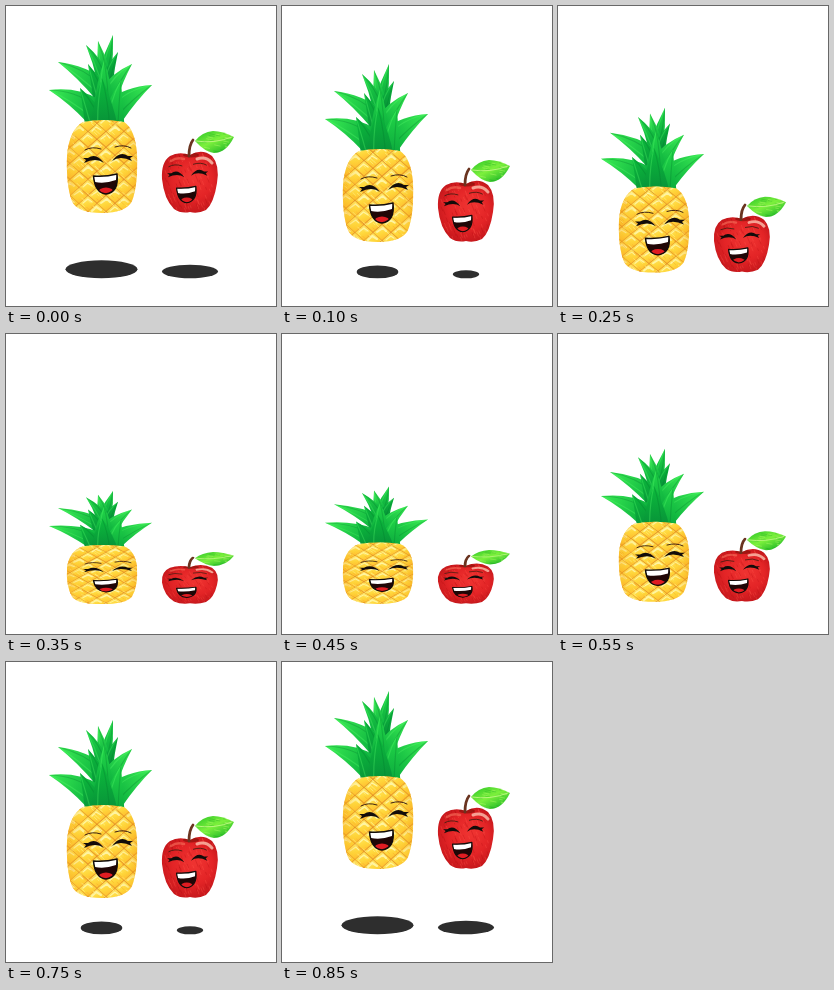
These frames come from a looping animation (270 by 300 pixels, 900 ms). An HTML page with a canvas:

```html
<!DOCTYPE html>
<html lang="en">
<head>
<meta charset="utf-8">
<title>Bouncing fruit</title>
<style>
  html, body { margin: 0; width: 100%; height: 100%; overflow: hidden; background: #fff; }
  canvas { display: block; }
</style>
</head>
<body>
<canvas id="stage" width="270" height="300"></canvas>
<script>
const ctx = document.getElementById('stage').getContext('2d');
const STEP = 50, STEPS = 18, GROUND = 265, REST = 207;
const SQUASH = [.925, .79, .635, .61, .66, .76, .86, .925];

let seed = 1;
function rnd() {
  seed = (seed * 16807) % 2147483647;
  return seed / 2147483647;
}
const between = (a, b) => a + (b - a) * rnd();

function fill(path, style) {
  ctx.fillStyle = style;
  ctx.fill(path);
}

function stroke(d, color, width) {
  ctx.strokeStyle = color;
  ctx.lineWidth = width;
  ctx.stroke(new Path2D(d));
}

function ellipse(x, y, rx, ry, style) {
  const p = new Path2D();
  p.ellipse(x, y, rx, ry, 0, 0, Math.PI * 2);
  fill(p, style);
}

function gradient(g, ...colors) {
  colors.forEach((c, i) => g.addColorStop(i / (colors.length - 1), c));
  return g;
}

function clipped(path, draw) {
  ctx.save();
  ctx.clip(path);
  draw();
  ctx.restore();
}

// Short pencil strokes scattered over a box
function pencil(n, x0, y0, x1, y1, dx, dy, colors) {
  for (let i = 0; i < n; i++) {
    const x = between(x0, x1), y = between(y0, y1), k = between(.5, 1.2);
    stroke(`M${x} ${y}l${dx * k} ${dy * k}`, colors[i % colors.length], .8);
  }
}

// Pointed leaf from base (ax, ay) to tip (tx, ty)
function blade(ax, ay, tx, ty, w, bend, base, tip) {
  const len = Math.hypot(tx - ax, ty - ay);
  const nx = -(ty - ay) / len, ny = (tx - ax) / len;
  const mx = (ax + tx) / 2 + nx * bend, my = (ay + ty) / 2 + ny * bend;
  const at = (x, y, k) => `${x + nx * w * k} ${y + ny * w * k}`;
  const p = new Path2D(`M${at(ax, ay, .5)}Q${at(mx, my, .36)} ${tx} ${ty}` +
    `Q${at(mx, my, -.36)} ${at(ax, ay, -.5)}Z`);
  fill(p, gradient(ctx.createLinearGradient(ax, ay, tx, ty), base, tip));
  clipped(p, () => {
    for (const k of [-.22, .2]) {
      stroke(`M${at(ax, ay, k)}Q${at(mx, my, k)} ${tx} ${ty}`,
        k > 0 ? 'rgba(0,120,45,.3)' : 'rgba(90,255,110,.3)', 1.2);
    }
  });
}

function face(x, y, k, eyeShift) {
  ctx.save();
  ctx.translate(x, y);
  ctx.scale(k, k);
  for (const [ex, ey, side] of [[-11, -17, -1], [17, -19, 1]]) {
    ctx.save();
    ctx.translate(ex + eyeShift, ey);
    ctx.scale(side, 1);
    fill(new Path2D('M-10 4Q-2 -7 6 -1L11 -1L8 1L10 4Q-2 -2 -10 4Z'), '#120c0a');
    stroke('M-7 -10Q2 -13 9 -9', '#3a1d10', 1);
    ctx.restore();
  }
  const mouth = new Path2D('M-11.5 0Q0 1 12 -2Q14 16 1 18Q-10 17 -11.5 0Z');
  fill(mouth, '#200606');
  clipped(mouth, () => {
    fill(new Path2D('M-12 0Q0 1 12 -3L11 4Q0 8 -10 6Z'), '#fff');
    ellipse(1, 17, 8, 5.5, '#e01c22');
  });
  ctx.strokeStyle = '#120c0a';
  ctx.lineWidth = 1.5;
  ctx.stroke(mouth);
  ctx.restore();
}

function scales() {
  const w = 18, h = 16;
  for (let row = 0; row < 14; row++) {
    for (let col = 0; col < 6; col++) {
      const x = 55 + col * w + (row % 2) * w / 2, y = 110 + row * h / 2;
      const p = new Path2D(
        `M${x - w / 2} ${y}L${x} ${y - h / 2}L${x + w / 2} ${y}L${x} ${y + h / 2}Z`);
      fill(p, gradient(ctx.createLinearGradient(x - 3, y - 8, x + 3, y + 8),
        '#ffe86a', '#ffd83c', '#ffb92e'));
      stroke(`M${x - w / 2} ${y}L${x} ${y + h / 2}L${x + w / 2} ${y}`,
        'rgba(226,142,34,.8)', between(1.2, 2.4));
      stroke(`M${x - 5} ${y - 1}L${x + between(-1, 1)} ${y - 5}L${x + 4} ${y - 2}`,
        'rgba(255,247,170,.9)', between(1, 2.2));
    }
  }
}

function pineapple() {
  const dark = ['#078f38', '#0cbc3c'], mid = ['#0aa63c', '#22d848'], light = ['#0cb23e', '#3cec54'];
  const leaves = [
    [99, 66, 107, 29, 13, 0, mid], [98, 64, 92, 35, 12, 0, light], [97, 72, 80, 39, 13, 3, mid],
    [101, 76, 112, 46, 12, -2, dark], [95, 84, 52, 56, 21, 5, light],
    [102, 90, 126, 58, 20, -4, light], [97, 98, 82, 58, 18, 2, dark],
    [87, 105, 43, 84, 26, 6, light], [109, 105, 146, 79, 25, -5, light],
    [98, 104, 98, 54, 22, 0, mid], [91, 122, 74, 82, 24, 3, dark], [107, 122, 115, 74, 24, -3, mid],
    [98, 122, 96, 72, 28, 0, dark]
  ];
  const body = new Path2D('M77 116Q97 112 118 116Q129 123 131 148Q132 180 126 195' +
    'Q120 207 96 207Q71 207 66 195Q60 180 61 150Q63 124 77 116Z');
  for (const [ax, ay, tx, ty, w, bend, colors] of leaves) blade(ax, ay, tx, ty, w, bend, ...colors);
  clipped(body, () => {
    scales();
    pencil(160, 60, 114, 130, 206, 3, 3, ['rgba(255,246,150,.7)', 'rgba(245,160,35,.5)']);
    ctx.fillStyle = gradient(ctx.createLinearGradient(61, 0, 131, 0),
      'rgba(240,150,20,.35)', 'rgba(255,205,45,0)', 'rgba(255,205,45,0)',
      'rgba(255,205,45,0)', 'rgba(240,150,20,.35)');
    ctx.fillRect(60, 108, 73, 100);
  });
  face(99, 170, 1, 0);
}

function apple() {
  const body = new Path2D('M184 149Q196 142 206 150Q214 159 211 177Q208 197 200 204' +
    'Q192 208 184 206Q175 208 168 203Q158 193 156 173Q155 156 164 150Q173 145 184 149Z');
  fill(body, gradient(ctx.createRadialGradient(189, 170, 4, 184, 176, 36),
    '#ee3230', '#e32426', '#bd1419'));
  clipped(body, () => {
    pencil(110, 157, 147, 210, 205, 1.5, 4,
      ['rgba(255,90,75,.4)', 'rgba(165,0,10,.3)']);
    ellipse(185, 149, 8, 2.5, 'rgba(125,15,8,.6)');
    stroke('M191 153Q200 150 206 157', 'rgba(255,205,185,.75)', 3);
    stroke('M165 155Q171 151 178 153', 'rgba(255,130,105,.5)', 2.5);
  });
  stroke('M183 150Q183 139 187 134', '#6a3420', 2.8);
  const leaf = new Path2D('M189 135Q196 126 207 125Q217 125 228 131Q220 147 208 147Q199 146 189 135Z');
  fill(leaf, gradient(ctx.createLinearGradient(200, 125, 211, 147), '#3fd02c', '#7cf03c', '#34c42c'));
  clipped(leaf, () => pencil(25, 192, 127, 225, 146, 5, 1,
    ['rgba(190,255,110,.5)', 'rgba(30,165,35,.4)']));
  stroke('M190 135Q208 138 226 131', '#b9f67c', 1);
  face(180, 182, .82, -1);
}

function pose(step) {
  const i = step < 13 ? step : 17 - step;
  if (i < 5) return { bottom: REST + (GROUND - REST) * i / 4, scale: 1, shade: i };
  const scale = SQUASH[i - 5];
  return { bottom: GROUND + 5 * Math.min(1, (1 - scale) * 4), scale, shade: 5 };
}

function shadow(x, bottom, rx, ry) {
  if (rx > 0) ellipse(x, bottom - ry, rx, ry, '#2e2e2e');
}

function draw(step) {
  const { bottom, scale, shade } = pose(step);
  seed = 4711;
  ctx.clearRect(0, 0, 270, 300);
  ctx.lineCap = ctx.lineJoin = 'round';
  shadow(95.5, 272.3, 36 - 7.6 * shade, 9 - 1.3 * shade);
  shadow(184, 272.3, 28 - 7.4 * shade, 6.8 - 1.4 * shade);
  ctx.save();
  ctx.translate(0, bottom);
  ctx.scale(1, scale);
  ctx.translate(0, -REST);
  pineapple();
  apple();
  ctx.restore();
}

const start = performance.now();
let shown = -1;
function tick() {
  const step = Math.floor((performance.now() - start) / STEP) % STEPS;
  if (step !== shown) draw(shown = step);
  requestAnimationFrame(tick);
}
tick();
</script>
</body>
</html>
```
